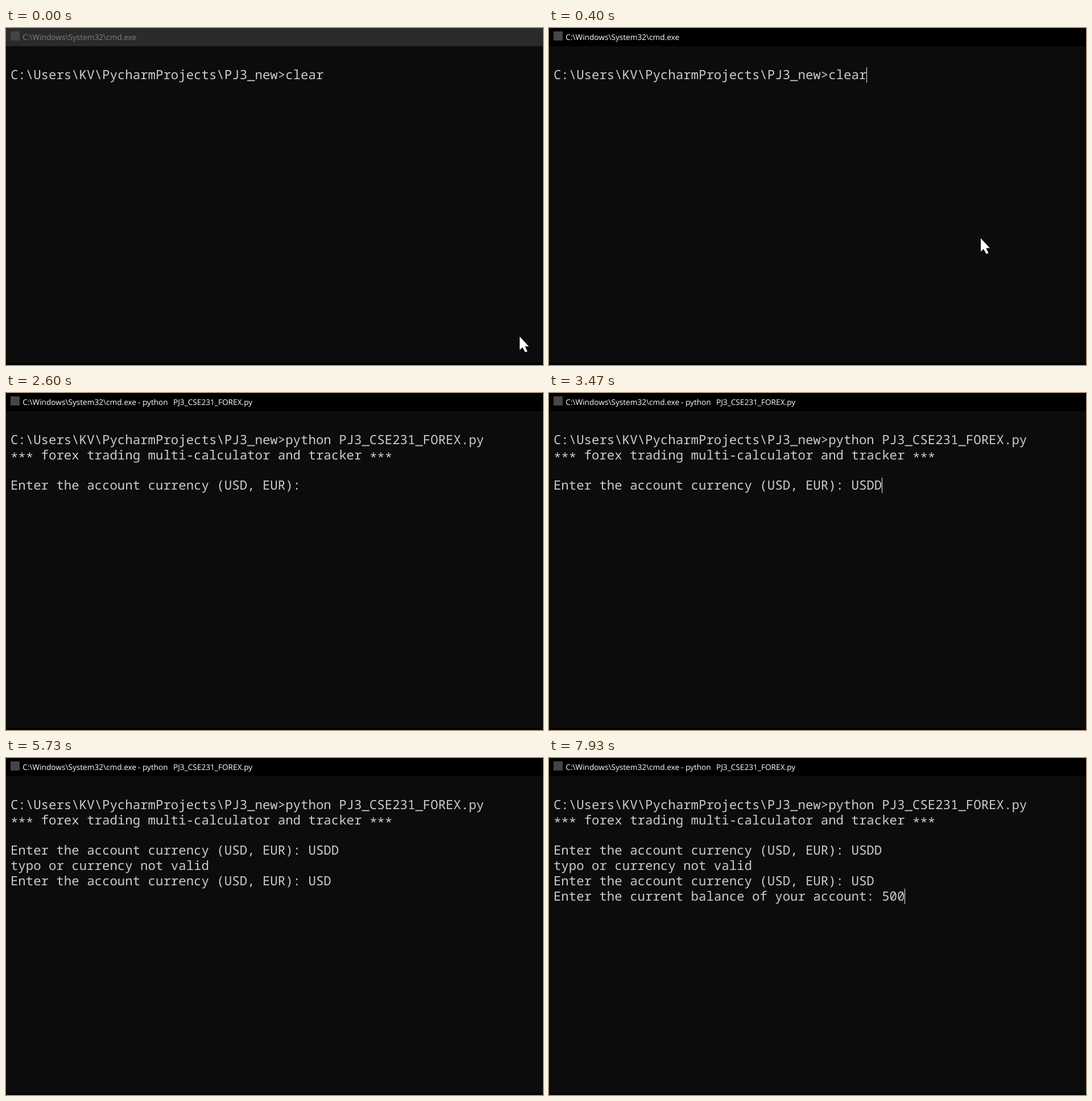
An HTML page for the animation above (8000 ms loop, 944 px wide and 593 px high).

```html
<!DOCTYPE html>
<html lang="en">
<head>
<meta charset="utf-8">
<title>Terminal session</title>
<style>
  html, body { margin: 0; width: 100%; height: 100%; overflow: hidden; background: #0c0c0c; }
  svg { display: block; width: 100vw; height: 100vh; }
  text { white-space: pre; text-rendering: geometricPrecision; }
  #rows { font: 22.383px "Noto Sans Mono", "DejaVu Sans Mono", monospace; fill: #ccc; }
  #title { font: 13.65px "Open Sans", "Noto Sans", sans-serif; }
</style>
</head>
<body>
<svg viewBox="0 0 944 593">
  <rect width="944" height="593" fill="#0c0c0c"/>
  <rect y="589" width="944" height="4" fill="#060304"/>
  <rect id="bar" width="944" height="32"/>
  <rect x="8" y="6" width="16" height="16" fill="#454545"/>
  <g id="title">
    <text x="29.3" y="20.7">C:\Windows\System32\cmd.exe</text>
    <g id="task">
      <text x="232" y="20.7">- python</text>
      <text x="294" y="20.7">PJ3_CSE231_FOREX.py</text>
    </g>
  </g>
  <g id="rows"></g>
  <rect id="caret" width="1" height="27" fill="#f3f3f3" shape-rendering="crispEdges"/>
  <path id="mouse" d="M0 0V23.5L5 18.8L9.6 27.6L13.6 26L9.2 17.2H16Z" fill="#fff"/>
</svg>
<script>
const LOOP = 8000, TICK = 200 / 3;
const LEFT = 7.9, ADVANCE = 13.43, TOP = 69.1, PITCH = 26.85, BASE = 20.6;
const $ = id => document.getElementById(id);

const PROMPT = 'C:\\Users\\KV\\PycharmProjects\\PJ3_new>';
const RUN = PROMPT + 'python PJ3_CSE231_FOREX.py';
const BANNER = '*** forex trading multi-calculator and tracker ***';
const ASK = 'Enter the account currency (USD, EUR): ';
const BALANCE = 'Enter the current balance of your account: ';
const started = [RUN, BANNER, ''];
const retry = [...started, ASK + 'USDD', 'typo or currency not valid'];
const accepted = [...retry, ASK + 'USD'];

// [start ms, lines on screen, caret shown at the end of the last line]
const steps = [
  [0, [PROMPT + 'clear'], false],
  [400, [PROMPT + 'clear'], true],
  [1000, [PROMPT + 'clear'], false],
  [1270, [RUN], false],
  [1330, [RUN], true],
  [1930, [RUN], false],
  [2000, [...started, ASK], true],
  [2600, [...started, ASK], false],
  [2800, [...started, ASK], true],
  [2870, [...started, ASK + 'U'], true],
  [3000, [...started, ASK + 'US'], true],
  [3270, [...started, ASK + 'USD'], true],
  [3470, [...started, ASK + 'USDD'], true],
  [4000, [...retry, ASK], true],
  [4600, [...retry, ASK + 'U'], false],
  [4730, [...retry, ASK + 'US'], false],
  [4800, [...retry, ASK + 'USD'], true],
  [5730, accepted, false],
  [5800, [...accepted, BALANCE], true],
  [6400, [...accepted, BALANCE], false],
  [6930, [...accepted, BALANCE], true],
  [7470, [...accepted, BALANCE], false],
  [7670, [...accepted, BALANCE + '5'], true],
  [7730, [...accepted, BALANCE + '50'], true],
  [7930, [...accepted, BALANCE + '500'], true]
];

const rows = Array.from({ length: 7 }, (_, i) => {
  const row = document.createElementNS('http://www.w3.org/2000/svg', 'text');
  row.setAttribute('x', LEFT);
  row.setAttribute('y', TOP + BASE + i * PITCH);
  return $('rows').appendChild(row);
});

// Asterisks sit at mid-height in the terminal.
const markup = line => line === BANNER
  ? line.replace(/^(\*+)(.*?)(\*+)$/, '<tspan dy="4">$1</tspan><tspan dy="-4">$2</tspan><tspan dy="4">$3</tspan>')
  : line.replace('>', '&gt;');

const show = (id, on) => $(id).setAttribute('visibility', on ? 'visible' : 'hidden');

let current;
function drawStep(step) {
  if (step === current) return;
  current = step;
  const [, lines, caretOn] = step;
  rows.forEach((row, i) => { row.innerHTML = markup(lines[i] || ''); });
  const last = lines.length - 1;
  $('caret').setAttribute('x', Math.floor(LEFT + lines[last].length * ADVANCE));
  $('caret').setAttribute('y', Math.floor(TOP + last * PITCH));
  show('caret', caretOn);
}

function draw(t) {
  drawStep(steps.findLast(step => step[0] <= t));

  const active = t >= 400;
  $('bar').setAttribute('fill', active ? '#000' : '#2b2b2b');
  $('title').setAttribute('fill', active ? '#fff' : '#808080');
  show('task', t >= 1930);

  // The pointer moves on a 15 fps grid.
  const p = Math.min(Math.floor((t + 4) / TICK) / 4, 1);
  const k = p * p * (3 - 2 * p);
  $('mouse').setAttribute('transform', `translate(${903 - 144 * k} ${543 - 173 * k})`);
  show('mouse', t < 1930);
}

const begin = performance.now();
function frame() {
  draw((performance.now() - begin) % LOOP);
  requestAnimationFrame(frame);
}
frame();
</script>
</body>
</html>
```
